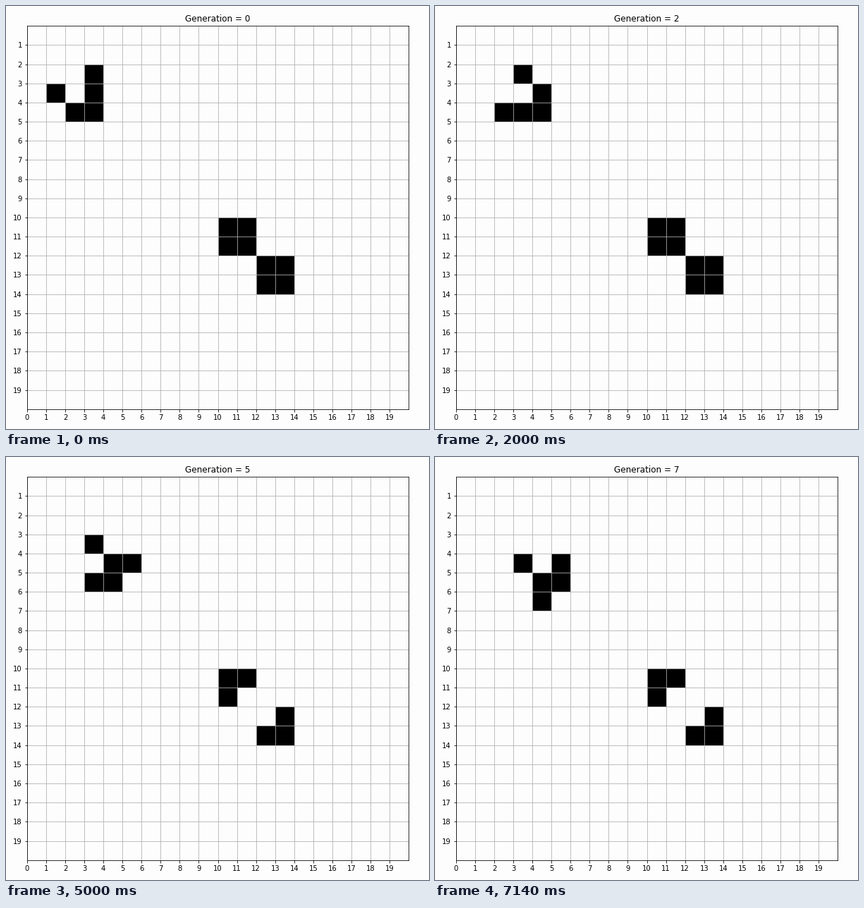
Recreate the animation shown at these times as a matplotlib script. Size 600 by 600 pixels, loop 8000 ms.

```python
import matplotlib.pyplot as plt
import numpy as np
from matplotlib.animation import FuncAnimation

SIZE = 600
DPI = 72
CELLS = 20
LOOP = 8000
STEP = 40
STARTS = np.array([1000, 2000, 3000, 4000, 5000, 6140, 7140])
PAPER = "#fefdfe"
LEFT, RIGHT, TOP, BOTTOM = 29.9, 571.2, 28.15, 571.7

plt.rcParams["font.family"] = "DejaVu Sans"


def seed_board():
    board = np.zeros((CELLS, CELLS), int)
    for row, col in [(2, 3), (3, 1), (3, 3), (4, 2), (4, 3)]:  # glider
        board[row, col] = 1
    board[10:12, 10:12] = board[12:14, 12:14] = 1  # beacon
    return board


def evolve(board):
    near = sum(np.roll(board, (dy, dx), (0, 1))
               for dy in (-1, 0, 1) for dx in (-1, 0, 1) if dy or dx)
    return ((near == 3) | ((board == 1) & (near == 2))).astype(int)


def live_cells(board):
    return np.ma.masked_equal(board, 0)


boards = [seed_board()]
for _ in STARTS:
    boards.append(evolve(boards[-1]))

fig = plt.figure(figsize=(SIZE / DPI, SIZE / DPI), dpi=DPI, facecolor=PAPER)
ax = fig.add_axes([LEFT / SIZE, 1 - BOTTOM / SIZE,
                   (RIGHT - LEFT) / SIZE, (BOTTOM - TOP) / SIZE],
                  facecolor=PAPER)
edges = np.arange(CELLS + 1)
# Snapped cells stay flush with the snapped grid lines.
mesh = ax.pcolormesh(edges, edges, live_cells(boards[0]), cmap="gray_r",
                     vmin=0, vmax=1, linewidth=0, snap=True)
ax.set_xlim(0, CELLS)
ax.set_ylim(CELLS, 0)
ax.set_xticks(range(CELLS))
ax.set_yticks(range(1, CELLS))
ax.tick_params(labelsize=10)
ax.grid(True, color="#b0b0b0", linewidth=0.8)
title = ax.set_title("Generation = 0", fontsize=12)


def draw(frame):
    gen = int(np.sum(frame * STEP + STEP / 2 >= STARTS))
    mesh.set_array(live_cells(boards[gen]))
    title.set_text(f"Generation = {gen}")
    return mesh, title


anim = FuncAnimation(fig, draw, frames=LOOP // STEP, interval=STEP,
                     repeat=True, repeat_delay=0, blit=False)
plt.show()
```
